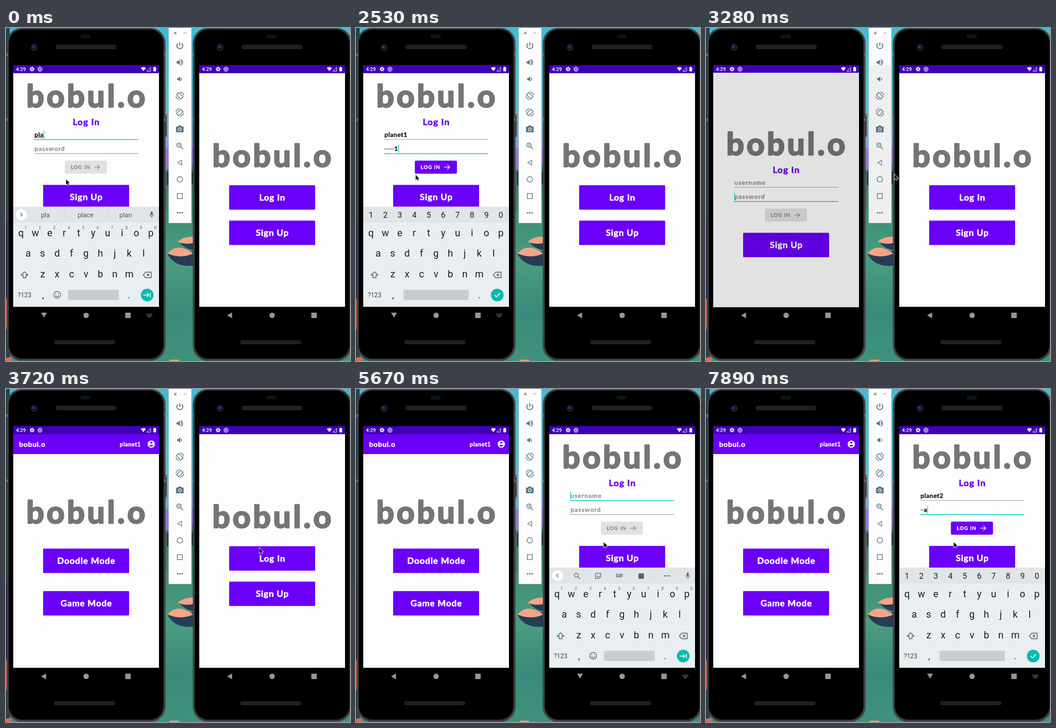
Recreate the animation shown at these times as an HTML page with a canvas. Size 760 by 737 pixels, loop 8000 ms.

```html
<!DOCTYPE html>
<html lang="en">
<head>
<meta charset="utf-8">
<title>Two phones logging in</title>
<style>
html, body { margin: 0; width: 100%; height: 100%; overflow: hidden; background: #000; }
canvas { display: block; }
</style>
</head>
<body>
<canvas id="stage" width="760" height="737"></canvas>
<script>
const ctx = document.getElementById('stage').getContext('2d');
const LOOP = 8000;
const BRAND = 'bobul.o';
const PURPLE = '#6b00f9', DARK = '#4000b8', TEAL = '#08d5c6', PAPER = '#fdfdfd';
const GREY = '#757575', HINT = '#999', TOOL = '#587582', KEY = '#14232c', KEYICON = '#56636b';

const ICON = {
  power: 'M12 3V13M6.9 5.9A8 8 0 1 0 17.1 5.9',
  speaker: 'M3 9v6h4l5 5V4L7 9Z',
  wave: 'M14.5 8.5A4 4 0 0 1 14.5 15.5',
  waves: 'M14.5 8.5A4 4 0 0 1 14.5 15.5M14 4.3A8 8 0 0 1 14 19.7',
  rotate: 'M9.2 2.5L21.5 14.8L14.8 21.5L2.5 9.2ZM13 1A11 11 0 0 1 23 11M11 23A11 11 0 0 1 1 13',
  camera: 'M2 5H7L9 2H15L17 5H22V20H2ZM12 7.5A4.7 4.7 0 1 0 12.1 7.5ZM12 9.3A3 3 0 1 1 11.9 9.3Z',
  lens: 'M15.5 9.5A6 6 0 1 0 3.5 9.5A6 6 0 1 0 15.5 9.5M14 14L21 21',
  plus: 'M6.5 9.5H12.5M9.5 6.5V12.5',
  back: 'M18 4V20L5 12Z',
  shift: 'M12 4L3 13H8V20H16V13H21Z',
  erase: 'M8 5H22V19H8L2 12ZM11 9L17 15M17 9L11 15',
  face: 'M21 12A9 9 0 1 0 3 12A9 9 0 1 0 21 12M8.5 8.5V10.5M15.5 8.5V10.5M7.5 14A5 5 0 0 0 16.5 14',
  sticker: 'M4 4H20V14L14 20H4ZM8 9H9M15 9H16M8 13A5 5 0 0 0 16 13',
  tab: 'M2 12H16M11 7L16 12L11 17M20 6V18',
  check: 'M5 12L10 17L19 7',
  arrow: 'M3 12H21M13 4L21 12L13 20',
  chevron: 'M9 6L15 12L9 18',
  micBody: 'M9 5A3 3 0 0 1 15 5V11A3 3 0 0 1 9 11Z',
  micStand: 'M6 11A6 6 0 0 0 18 11M12 17V21',
  wifi: 'M12 21L0 7A18 18 0 0 1 24 7Z',
  person: 'M12 5A3 3 0 1 0 12.1 5ZM6 16A8 5 0 0 1 18 16A7 6 0 0 1 6 16Z',
  pointer: 'M0 0V13.2L3 10.4L5 15L7.4 14L5.4 9.6H9.4Z'
};

function rect(x, y, w, h, color, r = 0) {
  ctx.fillStyle = color;
  ctx.beginPath();
  ctx.roundRect(x, y, w, h, r);
  ctx.fill();
}

function disc(x, y, r, color) {
  ctx.fillStyle = color;
  ctx.beginPath();
  ctx.arc(x, y, r, 0, 7);
  ctx.fill();
}

function ring(x, y, r, color, width) {
  ctx.strokeStyle = color;
  ctx.lineWidth = width;
  ctx.beginPath();
  ctx.arc(x, y, r, 0, 7);
  ctx.stroke();
}

function shape(color, ...points) {
  ctx.fillStyle = color;
  ctx.beginPath();
  points.forEach(([x, y]) => ctx.lineTo(x, y));
  ctx.fill();
}

// Icons live in a 24-unit box; a stroke width of 0 fills instead.
function icon(name, x, y, size, color, width = 0, flip = 1) {
  const path = new Path2D(ICON[name]);
  ctx.save();
  ctx.translate(x, y);
  ctx.scale(flip * size / 24, size / 24);
  ctx.translate(-12, -12);
  ctx.fillStyle = ctx.strokeStyle = color;
  ctx.lineWidth = width;
  if (width) ctx.stroke(path); else ctx.fill(path, 'evenodd');
  ctx.restore();
}

function plain(s, x, y, size, color, align = 'center', weight = 400) {
  ctx.font = `${weight} ${size}px Roboto, sans-serif`;
  ctx.textAlign = align;
  ctx.fillStyle = color;
  ctx.fillText(s, x, y);
}

// Heavy rounded lettering; y is the baseline.
function round(s, x, y, size, color, align = 'left', gap = 0.8, edge = size * 0.035) {
  ctx.font = `bold ${size}px Lato, sans-serif`;
  ctx.letterSpacing = gap + 'px';
  ctx.textAlign = align;
  ctx.fillStyle = ctx.strokeStyle = color;
  ctx.lineWidth = edge;
  ctx.lineJoin = 'round';
  ctx.fillText(s, x, y);
  ctx.strokeText(s, x, y);
  const w = ctx.measureText(s).width;
  ctx.letterSpacing = '0px';
  ctx.lineJoin = 'miter';
  return w;
}

const clip = (x, y, w, h, draw) => {
  ctx.save();
  ctx.beginPath();
  ctx.rect(x, y, w, h);
  ctx.clip();
  draw();
  ctx.restore();
};

const passed = (t, times) => times.filter(s => t >= s).length;

function scenery() {
  const g = ctx.createLinearGradient(0, 0, 0, 737);
  [[0, '#43b9d6'], [.2, '#52c0d4'], [.36, '#7da5d5'], [.43, '#397a72'], [.56, '#3f8f78'],
   [.7, '#4a9c80'], [.85, '#3b8a7a'], [1, '#3f927d']].forEach(([at, c]) => g.addColorStop(at, c));
  rect(0, 0, 760, 737, g);
  rect(0, 0, 8, 737, '#23444f');
  rect(0, 425, 4, 170, '#2b2350');
  rect(0, 600, 5, 66, '#d9694f');
  rect(352, 190, 4, 52, '#76707f');
  rect(352, 265, 8, 48, '#8f79d8');
  rect(408, 265, 5, 36, '#8f79d8');
  rect(352, 318, 3, 85, '#5b686c');
  rect(355, 318, 5, 30, '#24464c');
  rect(408, 318, 5, 28, '#1e3b41');
  ctx.fillStyle = '#263c56';
  ctx.beginPath();
  ctx.moveTo(357, 500);
  ctx.quadraticCurveTo(372, 530, 414, 526);
  ctx.lineTo(414, 494);
  ctx.moveTo(383, 474);
  ctx.quadraticCurveTo(394, 488, 414, 492);
  ctx.lineTo(414, 472);
  ctx.fill();
  ctx.fillStyle = '#f5a585';
  ctx.beginPath();
  ctx.moveTo(357, 499);
  ctx.quadraticCurveTo(378, 473, 414, 499);
  ctx.quadraticCurveTo(386, 512, 357, 499);
  ctx.moveTo(379, 473);
  ctx.quadraticCurveTo(395, 460, 414, 462);
  ctx.lineTo(414, 476);
  ctx.quadraticCurveTo(395, 480, 379, 473);
  ctx.fill();
  rect(0, 729, 14, 8, '#e8674d', 4);
  rect(361, 734, 22, 5, '#e8a169', 3);
}

function grille(x, y, w, h) {
  rect(x, y, w, h, '#3a3a3a', h / 2);
  rect(x + 1, y + 1, w - 2, h - 2, '#191919', h / 2);
  ctx.strokeStyle = '#303030';
  ctx.lineWidth = h - 4;
  ctx.setLineDash([1, 2]);
  ctx.beginPath();
  ctx.moveTo(x + 4, y + h / 2);
  ctx.lineTo(x + w - 4, y + h / 2);
  ctx.stroke();
  ctx.setLineDash([]);
}

function body() {
  rect(351, 196, 3.5, 42, '#3a3d40', 1);
  rect(1.8, 0, 350.4, 736.5, '#2b2c2d', 33);
  rect(3, 1, 348, 734.5, '#58595a', 32);
  rect(4.3, 2, 345.4, 732, '#2c2d2e', 31);
  rect(6.5, 3.5, 341, 728, '#000', 30);
  [56, 200].forEach(y => {
    rect(1, y, 3, 6, '#707172');
    rect(350, y, 3, 6, '#707172');
  });
  rect(165, 15, 22, 8, '#101318', 2);
  grille(110, 37.5, 134, 9);
  grille(107, 691.5, 134, 8);
  disc(62, 43, 7.5, '#20242e');
  disc(62, 43, 5, '#0c1230');
  disc(61, 42, 2.4, '#34488f');
}

function statusBar() {
  rect(16, 82, 322, 18.3, DARK);
  plain('4:29', 22, 95.3, 11, '#fff', 'left', 500);
  ring(57.5, 91, 2.8, '#fff', 2);
  ctx.setLineDash([1.73, 1.73]);
  ring(57.5, 91, 4.4, '#fff', 1.6);
  ctx.setLineDash([]);
  ring(75, 91, 4.6, '#fff', 1.2);
  ring(75, 91, 2.1, '#fff', 1.2);
  icon('wifi', 303.5, 91, 11, '#fff');
  ctx.strokeStyle = '#fff';
  ctx.lineWidth = 1;
  ctx.beginPath();
  ctx.moveTo(311, 95.5);
  ctx.lineTo(319.5, 95.5);
  ctx.lineTo(319.5, 87);
  ctx.closePath();
  ctx.stroke();
  rect(325.5, 87, 6, 9, '#fff', 1);
  rect(327, 86, 3, 2, '#fff');
}

function navBar(typing) {
  const c = '#979797';
  if (typing) {
    shape(c, [77.5, 630], [90.5, 630], [84, 641]);
    for (let r = 0; r < 2; r++)
      for (let k = 0; k < 6; k++) rect(310.5 + k * 2.2, 632.5 + r * 2.6, 1.3, 1.4, c);
    rect(313, 638, 7, 1.4, c);
  } else {
    shape(c, [77.5, 636], [88.5, 629.5], [88.5, 642.5]);
  }
  disc(177, 636, 6, c);
  rect(263.5, 630, 12, 12, c, 1);
}

const logo = base => round(BRAND, 179, base - 1.5, 69, GREY, 'center', 5.4, 3.2);

function bigButton(label, top) {
  rect(82, top, 190, 54, PURPLE, 1.5);
  round(label, 177.5, top + 34, 19.3, '#fff', 'center', 1);
}

function field(hint, y, focused, value, dots, composing) {
  const base = y + 4.5;
  let end = 62.5;
  if (!value && !dots) {
    round(hint, 63, base, 13.8, HINT, 'left', 1.1);
  } else {
    for (let i = 0; i < dots; i++) disc(64.4 + i * 3.6, y + 0.5, 1.1, '#222');
    end = 63 + dots * 3.6;
    if (value) {
      const w = round(value, end, base, 13.8, '#222', 'left', 0.6);
      if (composing) rect(63, base + 1.5, w, 1, '#333');
      end += w;
    }
  }
  if (focused) {
    rect(end, y - 9, 1.5, 18, TEAL);
    rect(62, y + 10, 230, 1.8, TEAL);
  } else {
    rect(62, y + 10, 230, 1.1, '#9b9b9b');
  }
}

function form(s, dy) {
  ctx.save();
  ctx.translate(0, dy);
  round('Log In', 177.5, 215, 19.5, PURPLE, 'center', 1.3);
  field('username', 236, s.focus === 'name', s.name, 0, s.focus === 'name');
  field('password', 267.3, s.focus === 'pass', s.last, s.dots);
  const on = s.ready;
  rect(130, 293.5, 93, 29, on ? (s.pressed ? '#8b3cfb' : PURPLE) : '#e0e1e2', 3);
  const ink = on ? '#fff' : '#8c8c8c';
  round('LOG IN', 143, 312, 11, ink, 'left', 1.1);
  icon('arrow', 201, 308, 16, ink, 2);
  ctx.restore();
}

function loginScreen(s) {
  const dy = s.keys ? 0 : 106;
  logo(176 + dy);
  form(s, dy);
  bigButton('Sign Up', 347.3 + dy);
}

// p runs from the welcome page (0) to the open login form (1).
function welcomeScreen(s, p) {
  logo(308 - 26.5 * p);
  const cut = 402 - 100 * p, low = 406 + 27 * p;
  if (p < 1) clip(16, 100, 322, cut - 100, () => bigButton('Log In', 348 - 62 * p));
  if (p > 0) clip(16, cut, 322, Math.max(0, low - cut), () => form(s, 106 + 38 * (1 - p)));
  bigButton('Sign Up', 426.3 + 27 * p);
}

function homeScreen(user, dy) {
  ctx.save();
  ctx.translate(0, dy);
  rect(16, 100, 322, 44, PURPLE);
  round(BRAND, 29, 128, 15.8, '#fff', 'left', 0.8);
  round(user, 298, 126.8, 12.6, '#fff', 'right', 0.6);
  disc(321, 122, 8, '#fff');
  icon('person', 321, 122, 19, PURPLE);
  logo(298.5);
  bigButton('Doodle Mode', 353.3);
  bigButton('Game Mode', 447.3);
  ctx.restore();
}

const GUESSES = {
  p: ['please', 'people'], pl: ['please', 'plus'], pla: ['place', 'plan'],
  plan: ['plans', 'planet'], plane: ['planet', 'planes'],
  planet: ['planets', 'planetary'], planet1: ['planet', 'planets'], planet2: ['planet', 'planets']
};

function mic() {
  icon('micBody', 322, 413, 17, KEYICON);
  icon('micStand', 322, 413, 17, KEYICON, 1.8);
}

function topRow(mode, word) {
  const column = i => 33 + 31.9 * i;
  if (mode === 'digits') {
    [...'1234567890'].forEach((d, i) => plain(d, column(i), 420.3, 18, KEY));
    return;
  }
  disc(34, 413, 12, '#fff');
  mic();
  icon('chevron', 34, 413, 16, KEYICON, 2.2, mode === 'words' ? 1 : -1);
  if (mode === 'words') {
    [word, ...GUESSES[word]].forEach((w, i) => plain(w, 87 + 88.7 * i, 418.5, 14.5, '#4d5860'));
    rect(128.5, 405, 1, 18, '#cbd0d3');
    rect(222.5, 405, 1, 18, '#cbd0d3');
  } else {
    icon('lens', 77.5, 414, 17, KEYICON, 2);
    icon('sticker', 124, 413.5, 17, KEYICON, 2);
    plain('GIF', 171, 417.3, 11, KEYICON, 'center', 700);
    rect(213, 408, 12, 12, KEYICON, 2);
    rect(247, 405, 1, 18, '#cbd0d3');
    for (let i = -1; i < 2; i++) disc(276 + i * 5, 413.5, 1.6, KEYICON);
  }
}

function keyboard(mode, word, drop) {
  const secret = mode === 'digits';
  clip(16, 100, 322, 517, () => {
    ctx.translate(0, drop);
    rect(16, 395.5, 322, 222, '#e9eef1');
    rect(16, 395.5, 322, 35, '#e1e5e8');
    topRow(mode, word);
    [['qwertyuiop', 33], ['asdfghjkl', 49], ['zxcvbnm', 81]].forEach(([row, x], r) =>
      [...row].forEach((k, i) => plain(k, x + 31.9 * i, 460.5 + 45.8 * r, 21.5, KEY)));
    if (!secret) [...'1234567890'].forEach((d, i) => plain(d, 43 + 31.9 * i, 445, 9, '#55626a'));
    icon('shift', 41, 546, 20, KEYICON, 2);
    icon('erase', 312, 546.5, 21, KEYICON, 1.9);
    plain('?123', 41, 595.5, 14, '#36444c');
    plain(',', 82, 598, 20, KEY);
    plain('.', 272, 598, 20, KEY);
    if (!secret) icon('face', 113, 590.5, 20, KEYICON, 1.9);
    const left = secret ? 105 : 137;
    rect(left, 579.5, 249 - left, 22.5, '#c9cdd1', 2);
    disc(312, 591, 14, '#04bcae');
    icon(secret ? 'check' : 'tab', 312, 591, 20, '#fff', 2.1);
  });
}

function phone(dx, s) {
  // The dimmed page is a touch larger than the screen it covers.
  const grow = s.dim ? 1 : 0;
  const top = 100 - grow, height = 517 + 2 * grow;
  ctx.save();
  ctx.translate(dx, 0);
  body();
  statusBar();
  rect(16, top, 322, height, PAPER);
  clip(16, top, 322, height, () => {
    if (s.page === 'home') homeScreen(s.user, s.shift);
    else if (s.page === 'welcome') welcomeScreen(s, s.open);
    else loginScreen(s);
    if (s.dim) rect(16, top, 322, height, 'rgba(0,0,0,.105)');
  });
  if (s.keys) keyboard(s.keys, s.name, 0);
  else if (s.drop) keyboard('digits', '', s.drop);
  navBar(!!s.keys);
  ctx.restore();
}

function toolbar(dim) {
  rect(359, 0, 51, 432, '#c5cacc');
  rect(360, 0, 49, 431, PAPER);
  if (dim) rect(360, 82, 49, 349, '#efefef');
  plain('×', 374, 15.5, 14, '#666');
  rect(392, 10.5, 6, 1, '#777');
  icon('power', 384, 39, 20, TOOL, 2.4);
  icon('speaker', 384, 76, 19, TOOL);
  icon('waves', 384, 76, 19, TOOL, 2.2);
  icon('speaker', 385, 113, 18, TOOL);
  icon('wave', 385, 113, 18, TOOL, 2.2);
  icon('rotate', 384, 150, 18.5, TOOL, 2);
  icon('rotate', 384, 187, 18.5, TOOL, 2, -1);
  icon('camera', 384, 224, 20, TOOL);
  icon('lens', 384, 261, 19, TOOL, 2.2);
  icon('plus', 384, 261, 19, TOOL, 1.5);
  icon('back', 384, 298, 16, TOOL, 2);
  ring(384, 335, 6, TOOL, 1.5);
  ctx.strokeRect(378.5, 366.5, 11, 11);
  for (let i = -1; i < 2; i++) disc(384 + i * 5, 409, 1.8, TOOL);
}

function leftState(t) {
  const user = 'planet1';
  if (t >= 3430) return { page: 'home', user, shift: t < 3580 ? 4 : 0 };
  if (t >= 2980)
    return { page: 'login', focus: 'pass', name: '', last: '', dots: 0,
             dim: t >= 3280, drop: t < 3130 ? 110 : 0 };
  const typed = passed(t, [1340, 1640, 1790, 1930, 2080, 2380, 2530]);
  const hidden = t >= 2680;
  return {
    page: 'login',
    focus: t < 1040 ? 'name' : 'pass',
    keys: t < 1040 ? 'words' : 'digits',
    name: user.slice(0, 3 + passed(t, [150, 300, 450, 740])),
    last: typed && !hidden ? user[typed - 1] : '',
    dots: hidden ? typed : Math.max(0, typed - 1),
    ready: typed > 0,
    pressed: t >= 2830
  };
}

function rightState(t) {
  const user = 'planet2';
  const s = { page: 'welcome', open: 0, name: '', last: '', dots: 0 };
  if (t < 5670) {
    const tick = 4620 + Math.floor((t - 4620) / 150) * 150;
    const x = Math.min(1, Math.max(0, (tick - 4700) / 600));
    s.open = 1 - (1 - x) ** 2;
    if (t >= 5520) s.focus = 'name';
    return s;
  }
  const typed = passed(t, [7440, 7590, 7890]);
  s.page = 'login';
  s.name = user.slice(0, passed(t, [6120, 6260, 6410, 6560, 6710, 6850, 7000]));
  s.focus = t < 7290 ? 'name' : 'pass';
  s.keys = t >= 7290 ? 'digits' : s.name ? 'words' : 'tools';
  s.last = typed ? user[typed - 1] : '';
  s.dots = Math.max(0, typed - 1);
  s.ready = typed > 0;
  return s;
}

const POINTER = [
  [0, 132, 334], [2380, 131, 324], [2680, 155, 310], [3130, 290, 316], [3280, 415.5, 323],
  [3430, 510, 342], [3580, 556, 350], [3720, 559, 351], [4620, 564, 353],
  [5220, 560, 349], [5370, 552, 343], [5520, 546.5, 338]
];

function pointer(t) {
  const [, x, y] = POINTER[passed(t, POINTER.map(k => k[0])) - 1];
  const path = new Path2D(ICON.pointer);
  ctx.save();
  ctx.translate(x + 0.8, y + 1);
  ctx.scale(0.85, 0.85);
  ctx.strokeStyle = '#fff';
  ctx.lineWidth = 2;
  ctx.stroke(path);
  ctx.fillStyle = '#000';
  ctx.fill(path);
  ctx.restore();
}

const start = performance.now();

function frame() {
  const t = Math.max(0, performance.now() - start) % LOOP;
  scenery();
  phone(0, leftState(t));
  phone(411, rightState(t));
  toolbar(t >= 3280 && t < 3430);
  pointer(t);
  requestAnimationFrame(frame);
}
frame();
</script>
</body>
</html>
```
